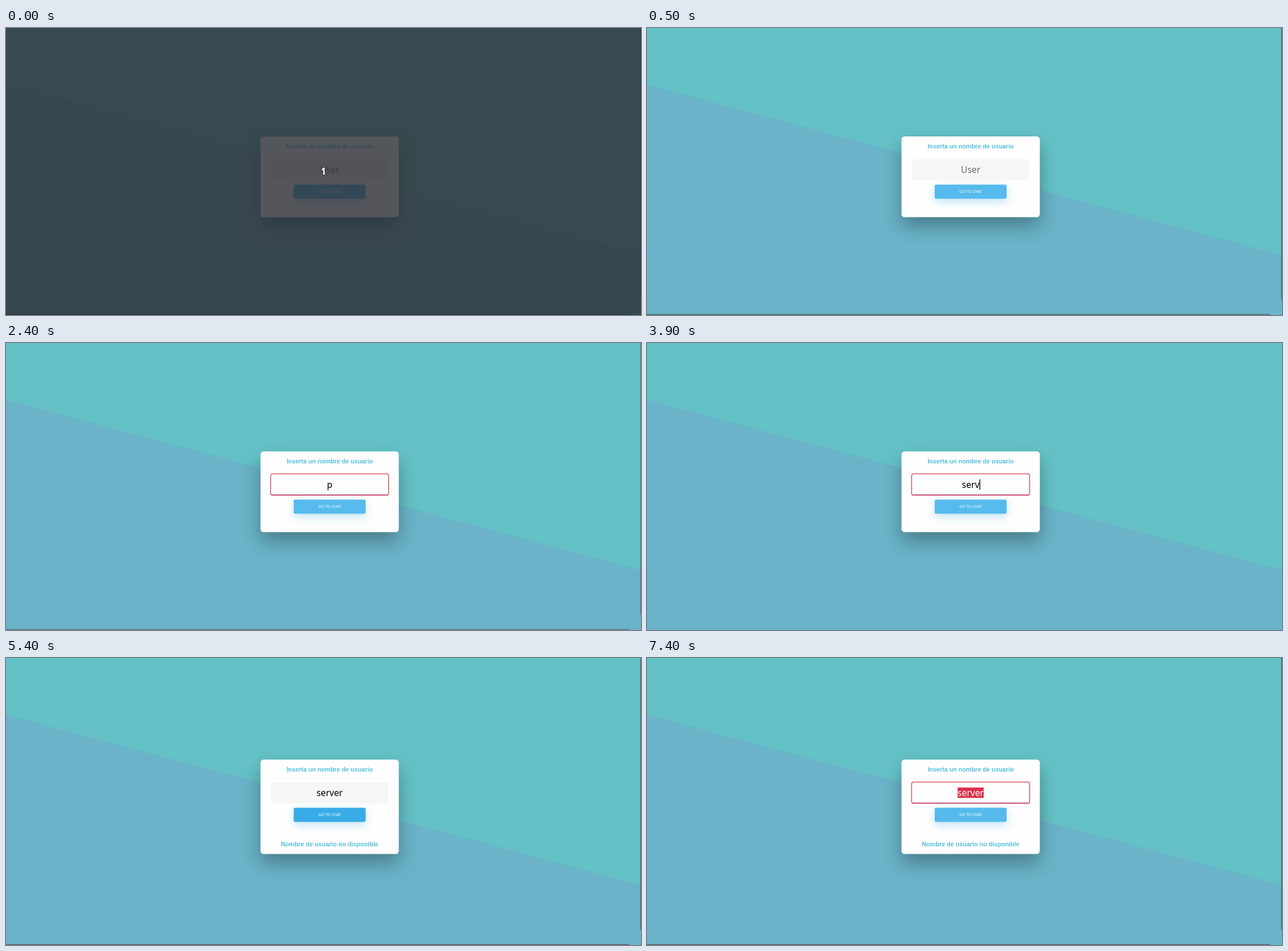
Recreate the animation shown at these times as an HTML page. Size 1114 by 503 pixels, loop 8 s.

```html
<!DOCTYPE html>
<html lang="es">
<head>
<meta charset="utf-8">
<title>Chat</title>
<style>
  html, body { margin: 0; height: 100%; overflow: hidden; background: #64c2c6; }
  svg { display: block; width: 100vw; height: 100vh; }
  text { text-anchor: middle; font-family: "Noto Sans", "Open Sans", sans-serif; }
  .heading { font: bold 10.78px "Liberation Sans", Arial, sans-serif; fill: #52c0da; }
  #panel { fill: #fefefe; filter: drop-shadow(0 16.2px 16.2px rgba(0, 0, 0, .3)); }
  #button { filter: drop-shadow(0 5.4px 8.1px rgba(95, 186, 233, .4)); }
  #label { font-size: 6.8px; fill: #fff; }
  #value { font-size: 15.6px; }
</style>
</head>
<body>
<svg viewBox="0 0 1114 503" preserveAspectRatio="none">
  <rect width="1114" height="503" fill="#64c2c6"/>
  <path d="M0 99.3L1114 398V503H0Z" fill="#6ab3c8"/>
  <path id="scrollbars" d="M1112.6 0h1.4v476.5h-1.4zM0 501.6h1093v1.4H0z" fill="#5c6668"/>

  <!-- The card's own origin is its top centre -->
  <g id="card">
    <rect id="panel" x="-121.3" width="242.6" rx="5.4"/>
    <text class="heading" y="21">Inserta un nombre de usuario</text>
    <rect id="field" x="-103" y="40" width="206" height="36.4" rx="2.7"/>
    <g id="focus" fill="none">
      <path id="underline" d="M-102 76H102" stroke="#8c3a9e" stroke-width="1.2"/>
      <rect x="-103.5" y="39.3" width="207" height="37.6" rx="3.4" stroke="#d63d55" stroke-width="1.3"/>
    </g>
    <rect id="selection" y="49" height="18.2" fill="#d93249"/>
    <text id="value" y="64"></text>
    <rect id="caret" y="49" width="1.4" height="18.2"/>
    <rect id="button" x="-63.1" y="84.5" width="126.2" height="24.8" rx="2.7"/>
    <text id="label" y="99.4">GO TO CHAT</text>
    <text id="error" class="heading" y="152">Nombre de usuario no disponible</text>
  </g>

  <g id="countdown">
    <rect width="1114" height="503" fill="#2b2c33" fill-opacity=".8"/>
    <text x="557" y="257" font-size="15.6" font-weight="600" fill="#fff">1</text>
  </g>
</svg>
<script>
const LOOP = 8000, STEP = 100;
const el = Object.fromEntries([...document.querySelectorAll("[id]")].map(e => [e.id, e]));

// Field contents from each time on
const typed = [[0, ""], [1900, "p"], [3000, ""], [3300, "s"], [3500, "se"],
  [3700, "ser"], [3900, "serv"], [4100, "serve"], [4300, "server"]];

const clamp = v => Math.min(1, Math.max(0, v));
const ramp = (t, start, length) => clamp((t - start) / length);
const ease = v => v * v * (3 - 2 * v);
const within = (t, ...spans) => spans.some(([from, to]) => t >= from && t < to);
const mix = (a, b, v) => `rgb(${a.map((c, i) => Math.round(c + (b[i] - c) * v))})`;
const show = (e, on) => e.setAttribute("visibility", on ? "visible" : "hidden");

function draw(t) {
  const failed = t >= 5000;
  el.card.setAttribute("transform", `translate(567.8 ${failed ? 178 : 190})`);
  el.panel.setAttribute("height", failed ? 165.5 : 141.6);
  show(el.error, failed);
  show(el.countdown, t < 100);

  const fade = ease(ramp(t, 900, 500)) - ease(ramp(t, 4900, 500)) + ease(ramp(t, 6900, 500));
  el.field.setAttribute("fill", mix([246, 246, 246], [254, 254, 254], fade));
  el.underline.setAttribute("opacity", fade);
  show(el.focus, within(t, [900, 4900], [6900, LOOP]));

  const hover = ease(ramp(t, 4800, 300)) - ease(ramp(t, 6800, 300));
  el.button.setAttribute("fill", mix([86, 186, 237], [57, 172, 231], hover));

  const text = typed.findLast(([start]) => t >= start)[1];
  const selected = t >= 7100;
  el.value.textContent = text || "User";
  el.value.setAttribute("fill", selected ? "#fff" : text ? "#000" : "#6b6b6b");

  const half = el.value.getComputedTextLength() / 2;
  el.selection.setAttribute("x", -half);
  el.selection.setAttribute("width", 2 * half);
  show(el.selection, selected);
  el.caret.setAttribute("x", text ? half : -.3);
  show(el.caret, within(t, [900, 1900], [2100, 2400], [3000, 3300], [3400, 4800], [6900, 7100]));

  el.scrollbars.setAttribute("opacity", 1 - ramp(t, 2300, 400) + ramp(t, 4400, 200));
}

function tick(now) {
  draw(Math.floor(now % LOOP / STEP) * STEP);
  requestAnimationFrame(tick);
}
draw(0);
requestAnimationFrame(tick);
</script>
</body>
</html>
```
